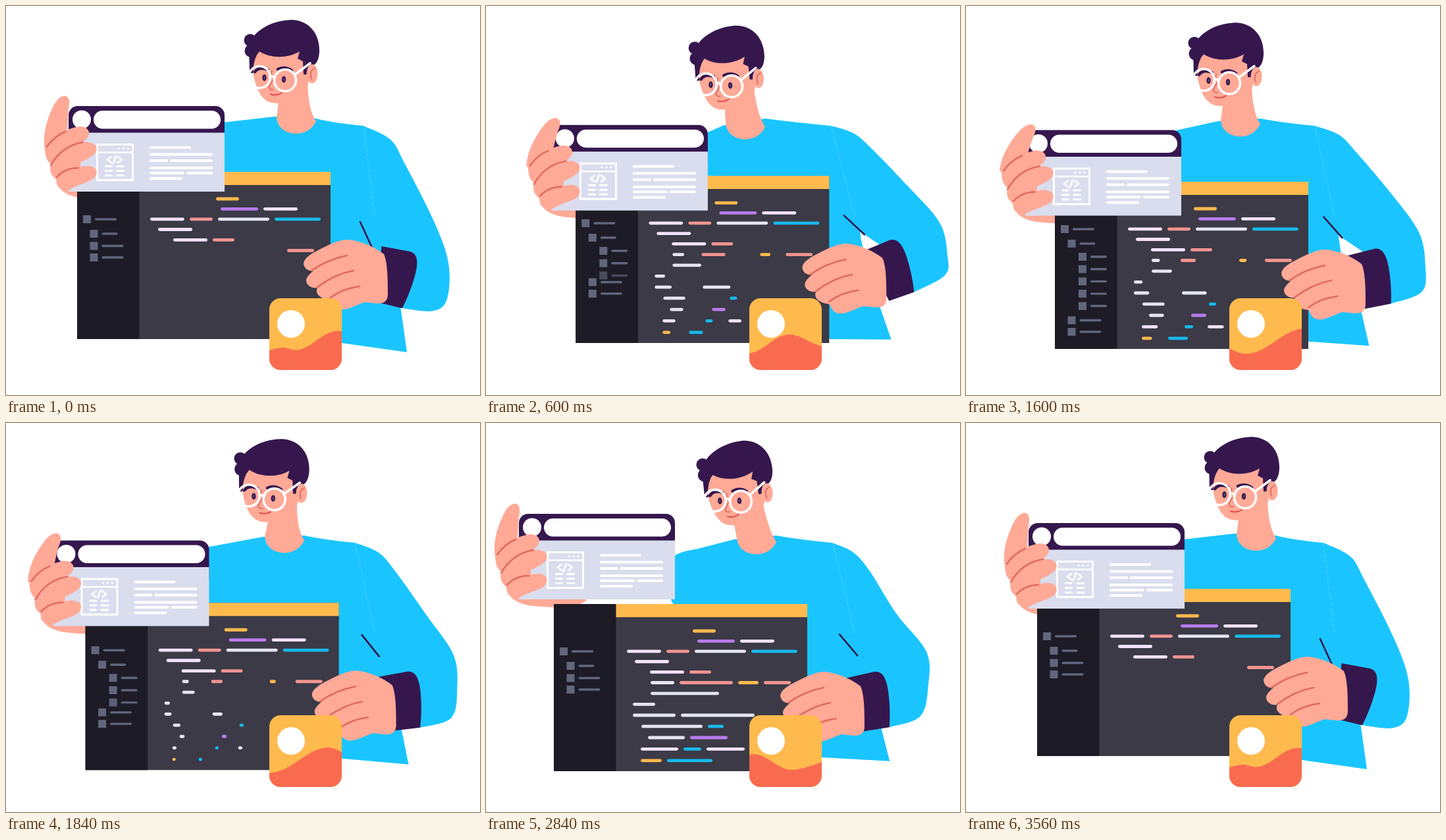
Animation of 720 by 591 pixels, one loop 3.84 s. Source, as an HTML page with a canvas:

```html
<!DOCTYPE html>
<html lang="en">
<head>
<meta charset="utf-8">
<title>Developer at work</title>
<style>
html, body { margin: 0; width: 100%; height: 100%; overflow: hidden; background: #fff; }
canvas { display: block; }
</style>
</head>
<body>
<canvas id="stage" width="720" height="591"></canvas>
<script>
const ctx = document.getElementById('stage').getContext('2d');
const LOOP = 3840, STEP = 40;
const NAVY = '#35174e', SKIN = '#ffa997', CREASE = '#df6a5f', SHIRT = '#1ac5ff', WHITE = '#ffffff', SLATE = '#62667d';
const ink = { O: '#ffba4e', V: '#b77cec', C: '#17b9ea', S: '#f19490', P: '#e6e5f2', L: '#f2e2fa' };

// Time, then: panel x, y, card x, y, lean of the body, tilt of the head, slide of the hills.
const poses = [
  [40, 108, 252, 95, 152, 0, 0, 0],
  [320, 123, 255, 96, 165, 30, 0, 19],
  [1040, 148, 262.5, 104, 199, 51, -7, 85],
  [1600, 135, 267, 90, 188.5, 24, 0, 133],
  [2160, 102, 281, 47, 163, 15, 1, 191],
  [2840, 103, 275, 50, 138, 30, -5, 240]
];
poses.push([3480, ...poses[0].slice(1, 7), 265]);

const clamp = v => Math.min(1, Math.max(0, v));
const ramp = (t, a, b) => clamp((t - a) / (b - a));
const smooth = u => u * u * (3 - 2 * u);
const mix = (a, b, u) => a + (b - a) * u;

// Cubic curve through the poses, at rest at both ends.
function sample(t) {
  const last = poses.length - 1;
  let i = 0;
  while (i < last - 1 && t > poses[i + 1][0]) i++;
  const h = poses[i + 1][0] - poses[i][0], u = clamp((t - poses[i][0]) / h);
  const slope = (j, n) => {
    if (j === 0 || j === last) return 0;
    const [a, b, c] = [poses[j - 1], poses[j], poses[j + 1]];
    const h0 = b[0] - a[0], h1 = c[0] - b[0];
    return ((b[n] - a[n]) / h0 * h1 + (c[n] - b[n]) / h1 * h0) / (h0 + h1);
  };
  return poses[i].map((a, n) => mix(a, poses[i + 1][n], smooth(u)) +
    h * u * (1 - u) * ((1 - u) * slope(i, n) - u * slope(i + 1, n)));
}

function fill(path, color) {
  ctx.fillStyle = color;
  ctx.fill(new Path2D(path));
}
function stroke(path, color, width) {
  ctx.strokeStyle = color;
  ctx.lineWidth = width;
  ctx.stroke(new Path2D(path));
}
function rect(x, y, w, h, color, radius = 0) {
  ctx.fillStyle = color;
  ctx.beginPath();
  ctx.roundRect(x, y, w, h, radius);
  ctx.fill();
}
function oval(x, y, rx, ry, color) {
  ctx.fillStyle = color;
  ctx.beginPath();
  ctx.ellipse(x, y, rx, ry, 0, 0, 7);
  ctx.fill();
}
// Rounded bar whose ends include the caps.
const bar = (x0, x1, y, color, w) => stroke(`M${x0 + w / 2} ${y}H${x1 - w / 2 + 0.01}`, color, w);

// Move by (x, y), turning around the point (cx, cy).
function at(x, y, draw, deg = 0, cx = 0, cy = 0) {
  ctx.save();
  ctx.translate(x + cx, y + cy);
  ctx.rotate(deg * Math.PI / 180);
  ctx.translate(-cx, -cy);
  draw();
  ctx.restore();
}

// Smooth continuation of a path through points.
function through(p) {
  const pt = i => p[Math.min(p.length - 1, Math.max(0, i))];
  let d = '';
  for (let i = 0; i < p.length - 1; i++) {
    const [a, b, c, e] = [pt(i - 1), pt(i), pt(i + 1), pt(i + 2)];
    d += `C${b[0] + (c[0] - a[0]) / 6} ${b[1] + (c[1] - a[1]) / 6} ` +
      `${c[0] - (e[0] - b[0]) / 6} ${c[1] - (e[1] - b[1]) / 6} ${c[0]} ${c[1]}`;
  }
  return d;
}

// The sleeve follows the hand: reach to the right, raise of the elbow.
function drawBody(px, py, lean, reach, raise) {
  const neck = 441 - lean, side = 179 + 0.45 * lean;
  const turn = (18 - raise) * Math.PI / 180, cos = Math.cos(turn), sin = Math.sin(turn);
  const cuffX = px + 452 + 55 * cos - 34 * sin, cuffY = py + 158 + 55 * sin + 34 * cos;
  const shoulder = [543 - 0.7 * raise + 0.15 * reach, 182];
  const arm = [
    shoulder,
    [584 - 1.1 * raise + 0.35 * reach, 203 - 0.3 * raise],
    [606 - 0.95 * raise + 0.4 * reach, 240 - 0.7 * raise],
    [650 - raise + 0.8 * reach, 327 - 1.65 * raise],
    [672 + 0.6 * reach, 390 - 1.85 * raise],
    [670 + 0.25 * raise + 0.8 * reach, 445 - 2 * raise],
    [cuffX + 47, cuffY + 4 - 0.9 * raise],
    [cuffX, cuffY]
  ];
  const top = `Q${shoulder[0] - 45} 178 ${neck + 30} 171`;
  fill(`M${neck - 33} ${168 + 0.28 * lean}L320 ${side - 1}Q284 ${side + 4} 278 ${side + 18}V${side + 71}` +
    `L298 ${side + 106}L470 507L510 ${512 - 0.13 * lean}L${609 + 0.14 * lean} ${526 - 0.41 * lean}` +
    `L600 462L560 320L${shoulder}${top}Z`, SHIRT);
  fill(`M560 320L${shoulder}${through(arm)}L${px + 472} ${py + 135}L540 320Z`, SHIRT);

  const x0 = 538 + 0.2 * reach, y0 = 328 - 0.3 * raise;
  const x = x0 + 18 + 0.4 * raise, y = y0 + 39 - 0.3 * raise;
  const gap = clamp((reach - 12) / 28), open = clamp(2 * gap);
  fill(`M${x - 20 * gap * gap} ${y - 14 * gap * gap}L${x + 30 * open} ${y + 20 * open}` +
    `l-5 ${20 * open}L${x} ${y + 35 * open}Z`, WHITE);
  stroke(`M${x0} ${y0}L${x} ${y}`, NAVY, 2.6);
}

function drawHead(lean, tilt) {
  const nx = 441 - lean, ny = 194 + 0.18 * lean;
  const ex = nx + 24 + 1.6 * tilt, ey = ny - 91 + 0.5 * tilt;
  fill(`M${ex - 51} ${ey + 43}L${nx - 30} ${ny - 25}C${nx - 29} ${ny - 9} ${nx - 16} ${ny} ${nx} ${ny}` +
    `C${nx + 14} ${ny} ${nx + 25} ${ny - 8} ${nx + 30} ${ny - 19}Q${nx + 18} ${ny - 36} ${ex - 7} ${ey + 12}` +
    `L${ex - 20} ${ey}Z`, SKIN);
  at(ex - 465, ey - 103, () => {
    oval(371, 52, 9.5, 9.5, NAVY);
    oval(372, 68, 9.5, 10, NAVY);
    fill('M370 102L369 60C373 42 398 22 434 21C462 22 477 44 476 70C475 84 470 90 464 91L456 106L444 100Z', NAVY);
    fill('M385 69C378 76 374 92 376 106C380 125 387 141 400 146C420 152 448 142 459 119L461 104L452 104' +
      'L451 84L443 80L446 69C428 80 402 80 385 69Z', SKIN);
    oval(465, 103, 8.5, 14.5, SKIN);
    stroke('M469 95Q460 98 464 111', CREASE, 1.8);
    stroke('M378 100Q385 91 398 97M413 96Q424 91 434 98', NAVY, 4.5);
    for (const [x, y] of [[392.5, 109], [422, 111.5]]) {
      oval(x, y, 3.2, 5, NAVY);
      oval(x, y, 0.8, 2.5, SLATE);
    }
    stroke('M404 99Q402 103 405 108M405 113Q398 124 400 125Q402 128 406 127', CREASE, 1.8);
    stroke('M402 134Q411 137 419 132', '#e04c50', 2);
    ctx.beginPath();
    ctx.arc(424, 113, 16.5, 0, 7);
    ctx.moveTo(401, 108);
    ctx.arc(385, 108, 16.5, 0, 7);
    ctx.lineWidth = 3.6;
    ctx.strokeStyle = WHITE;
    ctx.stroke();
    stroke('M401 107Q405 106 408 109M439 104L462 87', WHITE, 3.6);
  }, tilt, 465, 103);
}

// One row each: indent, then ink and length of every bar. A star marks bars that stay.
const rows = ['211 *O35', '218 *V57 *L52', '111 *L52 *S35 *P78 *C70', '123 *L52', '146 *L52 *S33',
  '147 P36 S81 O31 *S41', '147 P104', '120 P34', '120 P65 P112', '133 P93 C24', '143 P56 V57',
  '132 L57 C27 L58', '132 O32 C69'];

// Two rounds of typing, each followed by a quick wipe.
function typed(t, row) {
  const start = (t < 1715 ? 230 : 1645) + 16 * row;
  return ramp(t, start, start + 700) * (1 - ramp(t, start + 1170 - 11 * row, start + 1400 - 11 * row));
}

function drawCode(t) {
  rows.forEach((row, i) => {
    const [indent, ...bars] = row.split(' ');
    const y = 41 + 15.2 * i + 0.1 * i * i, k = typed(t, i);
    let x = +indent;
    for (const word of bars) {
      const [, stay, color, len] = word.match(/(\*?)(.)(\d+)/);
      if (stay || k > 0) bar(x, x + mix(5, +len, stay ? 1 : k), y, ink[color], 4.8);
      x += +len + 8;
    }
  });
}

function treeItem(x, y, len) {
  rect(x - 6, y - 6, 12, 12, SLATE);
  bar(x + 12, x + 12 + len, y, SLATE, 3.4);
}

function drawPanel(t) {
  rect(0, 0, 385, 254, '#3b3a46');
  rect(94, 0, 291, 20, ink.O);
  rect(0, 0, 94.5, 254, '#1d1b25');
  const slide = 98 * (smooth(ramp(t, 400, 800)) - smooth(ramp(t, 1700, 2000)));
  treeItem(15, 72, 33);
  treeItem(25.5, 94, 24);
  for (let i = 0; i < 5; i++) {
    ctx.globalAlpha = clamp((slide - 18.7 * i) / 18);
    treeItem(42, 114 + 18.7 * i, 25);
  }
  ctx.globalAlpha = 1;
  treeItem(25.5, 112.5 + slide, 33);
  treeItem(25.5, 130 + slide, 33);
  drawCode(t);
}

function drawCard() {
  rect(0, 0, 237, 60, NAVY, [14, 14, 0, 0]);
  rect(0, 40.5, 237, 89.5, '#dadded');
  oval(20, 20.5, 14, 14, WHITE);
  rect(38, 7, 193, 27.5, WHITE, 13.7);
  ctx.strokeStyle = WHITE;
  ctx.lineWidth = 3;
  ctx.strokeRect(43.5, 58.5, 54, 54);
  stroke('M44 70.5H97', WHITE, 2.5);
  stroke('M65 77L59 81.5L65 86M75 77L81 81.5L75 86M72 76L68 87', WHITE, 2.8);
  for (let i = 0; i < 3; i++) {
    oval(76 + 7 * i, 64.5, 1.7, 1.7, WHITE);
    bar(55, 67, 91.5 + 7 * i, WHITE, 3);
    bar(72, 85, 91.5 + 7 * i, WHITE, 3);
  }
  // Height, then where each bar of the line ends.
  for (const [y, ...ends] of [[63, 186], [73.5, 219], [83, 151, 219], [94, 219], [101.7, 176, 219], [110, 173]]) {
    let x = 123;
    for (const end of ends) {
      bar(x, end, y, WHITE, 4);
      x = end + 3;
    }
  }
}

function drawFingers(angle) {
  at(0, 0, () =>
    fill('M-36 66C-40 45 -33 20 -23 0C-17 -12 -9 -17 -4 -15C2 -13 2 -4 0 4C-2 20 0 30 -4 45L-10 62Z', SKIN),
    angle, -25, 53);
  fill('M-36 62L0 42L18 62L18 105L-2 129L-18 115Z', SKIN);
  fill('M-36 62C-25 45 0 33 17 31C32 31 35 43 26 51C15 60 -5 64 -24 90C-34 84 -36 75 -36 62Z', SKIN);
  fill('M-27 88C-15 70 10 56 25 55C40 54 47 63 40 72C30 84 0 88 -18 112C-28 105 -29 97 -27 88Z', SKIN);
  fill('M-18 110C-8 100 10 92 28 91C42 91 46 100 40 108C34 116 15 118 -2 129C-16 126 -20 120 -18 110Z', SKIN);
  stroke('M-33 62Q-22 46 -5 39M-27 90Q-10 60 22 55M-18 108Q-5 94 15 94', CREASE, 2.5);
}

function drawHand(angle) {
  at(0, 0, () =>
    fill('M556 364L600 358C613 358 617 372 618 390C619 415 617 430 615 444L575 447Z', NAVY), angle, 560, 410);
  fill('M453 395C449 385 462 377 478 369C498 359 508 355 520 355C540 357 560 366 574 377C580 390 580 420 580 437' +
    'C580 449 574 452 564 452L545 450C530 455 522 460 514 461C503 463 496 456 494 447' +
    'C480 446 468 438 473 428C462 430 453 421 457 413C460 408 464 405 467 402C460 403 455 400 453 395Z', SKIN);
  stroke('M464 402Q488 385 518 379M473 427Q500 407 528 402M493 443Q512 429 537 426', CREASE, 2.6);
}

// Low and high points of the hills in the little picture.
const hills = [[375, 520], [418, 514.5], [443, 521], [500, 499.7], [563, 525], [643, 497], [708, 528.5], [810, 510]];
function hill(s) {
  let i = 0;
  while (i < hills.length - 2 && s > hills[i + 1][0]) i++;
  const [a, b] = [hills[i], hills[i + 1]];
  return mix(a[1], b[1], (1 - Math.cos(Math.PI * ramp(s, a[0], b[0]))) / 2);
}

function drawPicture(t, slide) {
  ctx.save();
  ctx.beginPath();
  ctx.roundRect(400, 444, 110, 109, 17);
  ctx.clip();
  rect(400, 444, 110, 109, ink.O);
  oval(433, 483, 21, 21, WHITE);
  const blend = smooth(ramp(t, 2840, 3480));
  let d = 'M400 553';
  for (let x = 400; x <= 510; x += 2) {
    const y = mix(hill(x + slide), hill(x + slide - 265), blend) - 0.125 * (x - 455);
    d += `L${x} ${y}`;
  }
  fill(d + 'V553Z', '#f96b4f');
  ctx.restore();
}

function draw(t) {
  const [, px, py, cx, cy, lean, tilt, slide] = sample(t);
  const reach = px - 108, drop = py - 252;
  const raise = 0.5 * lean + 0.25 * reach + 0.4 * drop;
  ctx.lineCap = ctx.lineJoin = 'round';
  rect(0, 0, 720, 591, WHITE);
  drawBody(px, py, lean, reach, raise);
  drawHead(lean, tilt);
  at(cx, cy, () => fill('M-18 105C-19 122 -12 132 10 138C35 143 75 143 90 138Q102 134 105 128L60 100Z', SKIN));
  at(px, py, () => drawPanel(t));
  at(cx, cy, () => {
    drawCard();
    drawFingers(Math.max(0, 0.4 * (cy - 152)));
  });
  at(reach, drop, () => drawHand(18 - raise));
  drawPicture(t, slide);
}

function frame(now) {
  let t = Math.floor(now % LOOP / STEP) * STEP;
  if (t < 80 || t >= 3560) t = 0;
  draw(Math.min(t, 3320));
  requestAnimationFrame(frame);
}
frame(0);
</script>
</body>
</html>
```
